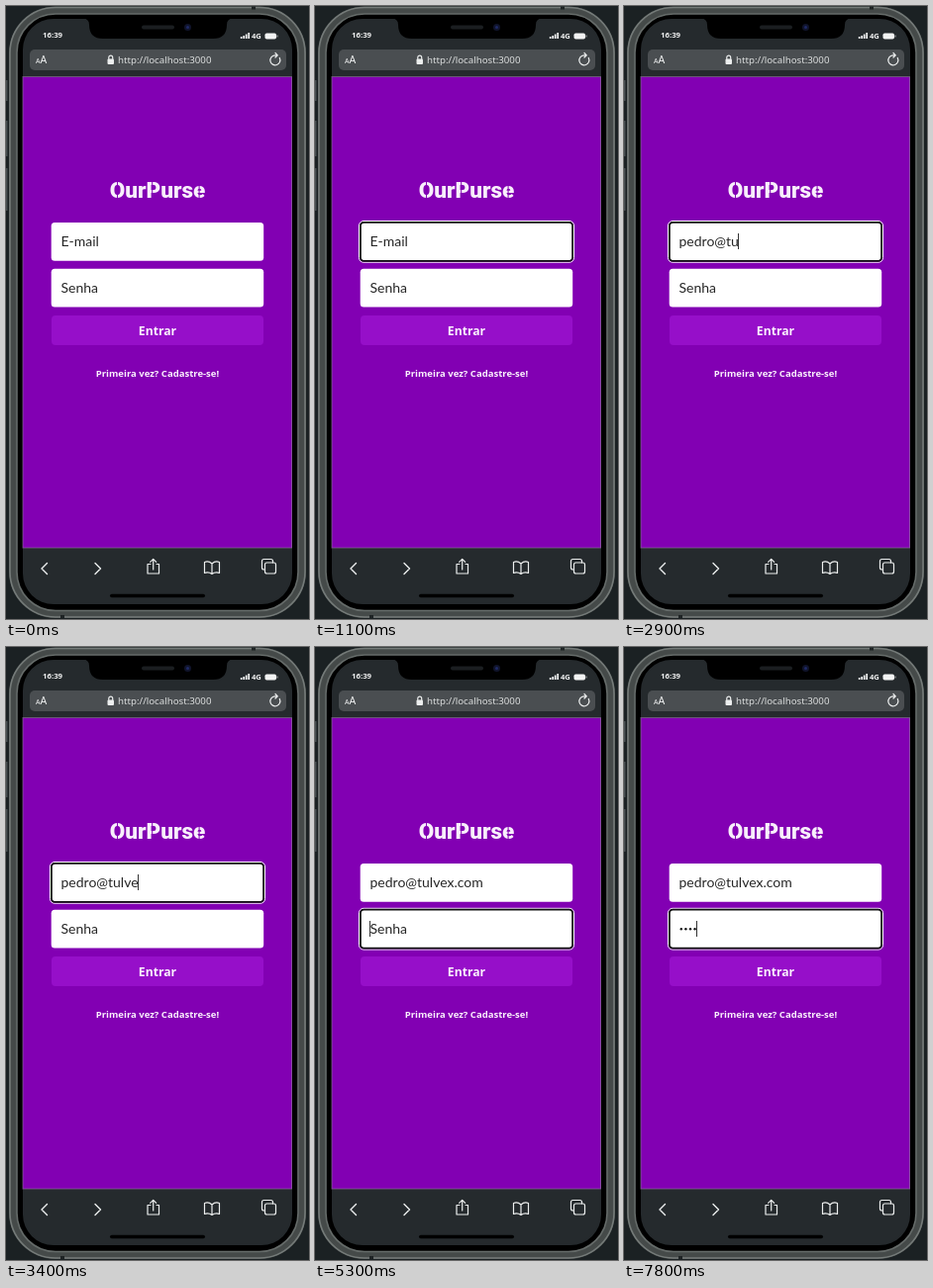
Animation, 306 px wide and 620 px high, one loop 8 s. Source, as an HTML page:

```html
<!DOCTYPE html>
<html lang="pt-BR">
<head>
<meta charset="utf-8">
<title>Login</title>
<style>
  html, body { margin: 0; width: 100%; height: 100%; overflow: hidden; background: #1b2123; }
  svg { display: block; width: 306px; height: 620px; }
  text { white-space: pre; }
  .field { font: 14px Lato, sans-serif; fill: #262626; }
  .bold { font-family: "Open Sans", sans-serif; font-weight: 700; text-anchor: middle; fill: #faf0fd; }
  .ui { font-family: "Noto Sans", sans-serif; fill: #f2f3f3; }
  .icon { fill: none; stroke: #eceeee; stroke-width: 1.2; stroke-linecap: round; stroke-linejoin: round; }
</style>
</head>
<body>
<svg viewBox="0 0 306 620">
  <rect width="306" height="620" fill="#1b2123"/>

  <!-- side buttons -->
  <g fill="#4a5153">
    <rect x="0" y="75" width="1.500" height="21"/>
    <rect x="0" y="116" width="1.500" height="36"/>
    <rect x="0" y="164" width="1.500" height="43"/>
  </g>

  <!-- phone body: metal band, then black bezel -->
  <rect x="3" y="0.500" width="300" height="618.500" rx="47" fill="#454a49"/>
  <rect x="4" y="1.500" width="298" height="616.500" rx="46" fill="none" stroke="#757b79" stroke-width="1.600"/>
  <rect x="11" y="8" width="284" height="603.500" rx="39" fill="#000" stroke="#656b69" stroke-width="1.600"/>
  <g fill="#1f2425">
    <rect x="248" y="0.500" width="4" height="3"/>
    <rect x="55" y="616" width="4" height="3"/>
  </g>

  <!-- screen -->
  <clipPath id="screen"><rect x="17" y="13" width="272" height="592" rx="31"/></clipPath>
  <g clip-path="url(#screen)">
    <rect x="17" y="13" width="272" height="592" fill="#252a2d"/>
    <rect x="17" y="72" width="272" height="476" fill="#8200b3"/>
  </g>
  <rect x="17" y="71.500" width="271.500" height="476.500" fill="none" stroke="#8a6a9c" stroke-opacity="0.700"/>
  <path d="M78 12.500Q84 13 84 19Q84 33 98 33H209Q223 33 223 19Q223 13 229 12.500Z" fill="#000"/>
  <rect x="137" y="19.500" width="33" height="4" rx="2" fill="#1b1e21"/>
  <circle cx="183.500" cy="21.500" r="3.500" fill="#10142c"/>
  <circle cx="183.500" cy="21.500" r="1.500" fill="#1f2a66"/>

  <!-- status bar -->
  <g class="ui" font-weight="700">
    <text x="37" y="32" font-size="7.800">16:39</text>
    <text x="248" y="33" font-size="7.600">4G</text>
  </g>
  <path d="M237.700 33v-2M240.200 33v-3M242.700 33v-4.500M245.200 33v-6" stroke="#f2f3f3" stroke-width="1.700"/>
  <rect x="261.500" y="27.500" width="11.500" height="6" rx="1.800" fill="#f2f3f3"/>
  <path d="M274 29.500v2" stroke="#b4b7b8"/>

  <!-- address bar -->
  <rect x="24" y="44" width="259" height="21" rx="5" fill="#4a4e51"/>
  <g class="ui">
    <text x="30" y="58" font-size="7">A</text>
    <text x="34.500" y="58" font-size="10.500">A</text>
    <text x="113" y="58" font-size="9.700" fill="#dcdede">http://localhost:3000</text>
  </g>
  <rect x="102.500" y="53.500" width="6.500" height="5.500" rx="1" fill="#eceeee"/>
  <path class="icon" d="M103.800 53.500v-1.500a1.950 1.950 0 0 1 3.900 0v1.500"/>
  <path class="icon" d="M276.300 52.500A5 5 0 1 1 271.500 49.800H274M272 47.500L274.300 49.800L272 52"/>

  <!-- toolbar -->
  <g class="icon">
    <path d="M41.500 563.500L36 569L41.500 574.500M90 563.500L95.500 569L90 574.500" stroke-width="1.400"/>
    <path d="M146 564.500H143V574H154.500V564.500H152M148.700 570V559.500M145.700 562.300L148.700 559.300L151.700 562.300"/>
    <path d="M208 564Q204.500 560.800 200.500 562.500V573.500Q204.500 572 208 574.500Q211.500 572 215.500 573.500V562.500Q211.500 560.800 208 564V574.500"/>
    <path d="M261.500 570H260.500Q258.500 570 258.500 568V561.500Q258.500 559.500 260.500 559.500H267.500Q269.500 559.500 269.500 561.500V563"/>
    <rect x="261.500" y="563" width="11" height="11" rx="2"/>
  </g>
  <rect x="105" y="594.800" width="96" height="3.400" rx="1.700" fill="#000"/>

  <!-- login form -->
  <text id="title" x="153" y="194" text-anchor="middle" font-family="Roboto, sans-serif" font-weight="900" font-size="22.500" fill="#f8effb">OurPurse</text>
  <g id="slits" fill="#8200b3"></g>
  <g fill="#fff">
    <rect x="45.700" y="219" width="214.500" height="38.700" rx="3.500"/>
    <rect x="45.700" y="265.800" width="214.500" height="38.700" rx="3.500"/>
  </g>
  <rect x="46" y="313" width="214" height="30" rx="4" fill="#960fc9"/>
  <g id="ring" fill="none">
    <rect x="44.500" y="217.500" width="217" height="41.700" rx="4.500" stroke="#fff"/>
    <rect x="45.900" y="218.900" width="214.200" height="38.900" rx="3.500" stroke="#101010" stroke-width="1.800"/>
  </g>
  <text id="email" class="field" x="55.500" y="243"></text>
  <text id="hint" class="field" x="55.500" y="290">Senha</text>
  <g id="dots" fill="#111"></g>
  <g class="bold">
    <text x="153" y="332.500" font-size="12.200">Entrar</text>
    <text x="153" y="375.300" font-size="9.530">Primeira vez? Cadastre-se!</text>
  </g>
  <rect id="caret" width="1" height="16" fill="#333"/>
</svg>

<script>
const LOOP = 8000, BLINK = 600, LEFT = 55.5, DOT_STEP = 4.6;
const EMAIL = 'pedro@tulvex.com';
const emailFocus = 500, passFocus = 5300;
const emailKeys = [1400, 1600, 1800, 2000, 2200, 2500, 2700, 2800,
                   3000, 3300, 3400, 3700, 4100, 4200, 4500, 4600];
const passKeys = [5900, 6100, 6500, 6600];

const el = id => document.getElementById(id);
const [title, slits, ring, email, hint, dots, caret] =
  ['title', 'slits', 'ring', 'email', 'hint', 'dots', 'caret'].map(el);

function add(parent, tag, attrs) {
  const node = document.createElementNS('http://www.w3.org/2000/svg', tag);
  for (const k in attrs) node.setAttribute(k, attrs[k]);
  return parent.appendChild(node);
}
const show = (node, on) => node.setAttribute('visibility', on ? 'visible' : 'hidden');

// stencil cuts through some letters of the title
for (const [i, at] of [[0, 0.5], [3, 0.42], [7, 0.5]]) {
  const a = title.getStartPositionOfChar(i).x, b = title.getEndPositionOfChar(i).x;
  add(slits, 'rect', { x: a + (b - a) * at - 0.5, y: 177, width: 1, height: 18 });
}

const dotNodes = passKeys.map((_, i) =>
  add(dots, 'circle', { cx: LEFT + DOT_STEP * (i + 0.5), cy: 285.3, r: 1.2 }));

function draw(t) {
  const typed = emailKeys.filter(k => k <= t).length;
  const secret = passKeys.filter(k => k <= t).length;
  const onPass = t >= passFocus;
  const focused = t >= emailFocus;

  email.textContent = typed ? EMAIL.slice(0, typed) : 'E-mail';
  show(hint, !secret);
  dotNodes.forEach((d, i) => show(d, i < secret));

  show(ring, focused);
  ring.setAttribute('transform', `translate(0 ${onPass ? 46.8 : 0})`);

  const last = onPass ? passKeys[secret - 1] || passFocus
                      : emailKeys[typed - 1] || emailFocus;
  const width = onPass ? secret * DOT_STEP
                       : typed ? email.getComputedTextLength() : 0;
  show(caret, focused && Math.floor((t - last) / BLINK) % 2 === 0);
  caret.setAttribute('x', Math.round(LEFT + width - 0.5));
  caret.setAttribute('y', onPass ? 277 : 230);
}

function tick() {
  draw(performance.now() % LOOP);
  requestAnimationFrame(tick);
}
tick();
</script>
</body>
</html>
```
